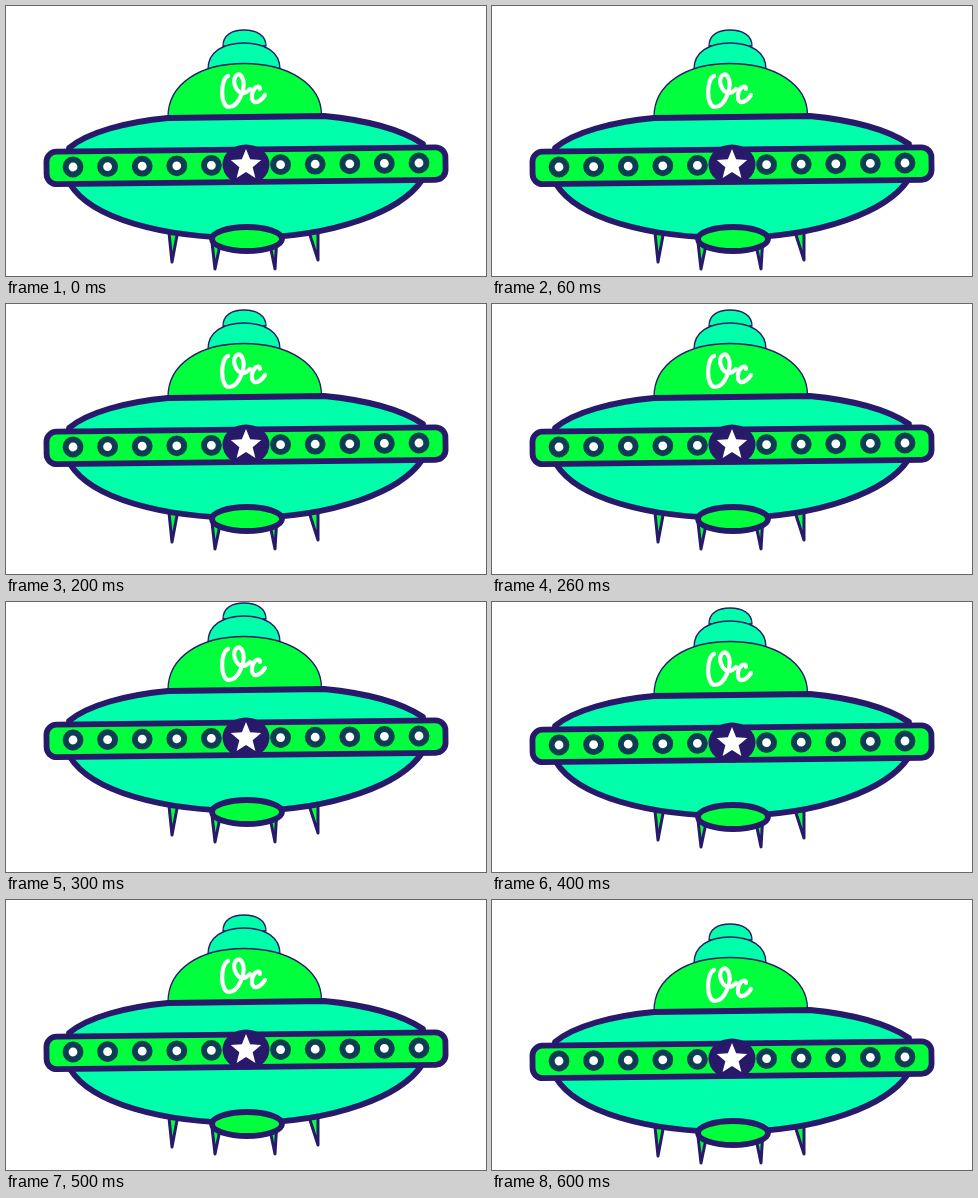
Write an HTML page that moves like this. It is 480 by 270 pixels and loops after 700 ms.

```html
<!DOCTYPE html>
<html lang="en">
<head>
<meta charset="utf-8">
<title>Hovering saucer</title>
<style>
  html, body { margin: 0; width: 100%; height: 100%; overflow: hidden; background: #fff; }
  svg { display: block; width: 100vw; height: 100vh; }
  .mint { fill: #00ffaa; }
  .green { fill: #00ff3c; }
  .line { stroke: #29196b; stroke-width: 5.8; stroke-linejoin: round; }
  .thin { stroke-width: 1.3; }
  .leg { stroke-width: 3; }
  .script { fill: none; stroke: #fff; stroke-width: 4.2; stroke-linecap: round; stroke-linejoin: round; }
</style>
</head>
<body>
<svg viewBox="0 0 480 270">
  <g id="ship">
    <!-- tower -->
    <path class="mint line thin" d="M217 40C217 29 226 24 238 24S260 29 260 40Z"/>
    <path class="mint line thin" d="M202 63C202 46 217 37 238 37S274 46 274 63Z"/>
    <path class="green line thin" d="M162 111C162 78 194 57.500 238 57.500S315.500 78 315.500 109Z"/>
    <g class="script" role="img" aria-label="Oc">
      <path d="M222 70C214 73 214 101 223 101C233 101 241 80 236 71C232 64 225 72 230 82C234 89 240 88 244 83"/>
      <path d="M254 83C254 78 247 81 246 89C245 99 253 98 259 89"/>
    </g>

    <!-- legs -->
    <g class="green line leg">
      <path d="M162.500 222L172 224L166 256Z"/>
      <path d="M205.500 232L215 234L209 263Z"/>
      <path d="M263 234L271 230L269 263Z"/>
      <path d="M303 226L312 222L312 254Z"/>
    </g>

    <!-- hull -->
    <path class="mint line" d="M63 142C82 126 120 116 162 112L318 110C360 114 396 124 417 138L416 174C395 205 330 231 241 232C155 232 85 212 64 178Z"/>
    <ellipse class="green line" cx="241" cy="233" rx="35" ry="12"/>

    <!-- belt -->
    <g transform="rotate(-.66 240 159)">
      <rect class="green line" x="40.500" y="143.500" width="399" height="32.500" rx="10"/>
      <g id="lamps" fill="#fff" stroke="#0d3d52" stroke-width="6"></g>
    </g>
    <ellipse cx="240" cy="158.500" rx="23.500" ry="20" fill="#29196b"/>
    <path id="star" fill="#fff"/>
  </g>
</svg>
<script>
  const get = id => document.getElementById(id);

  get('lamps').innerHTML = [-5, -4, -3, -2, -1, 1, 2, 3, 4, 5]
    .map(i => `<circle cx="${240 + i * 34.6}" cy="159" r="7.4"/>`).join('');

  const points = Array.from({ length: 10 }, (_, i) => {
    const a = i * Math.PI / 5, r = i % 2 ? 7 : 16;
    return [240 + r * Math.sin(a), 159 - r * Math.cos(a)];
  });
  get('star').setAttribute('d', 'M' + points.join('L') + 'Z');

  // Seven held poses: rise in equal steps to a limit, then sink the same way
  function draw() {
    const step = Math.floor(performance.now() % 700 / 100);
    const lift = Math.min(23, 9 * Math.min(step, 6 - step));
    get('ship').setAttribute('transform', `translate(0 ${-lift})`);
    requestAnimationFrame(draw);
  }
  draw();
</script>
</body>
</html>
```
